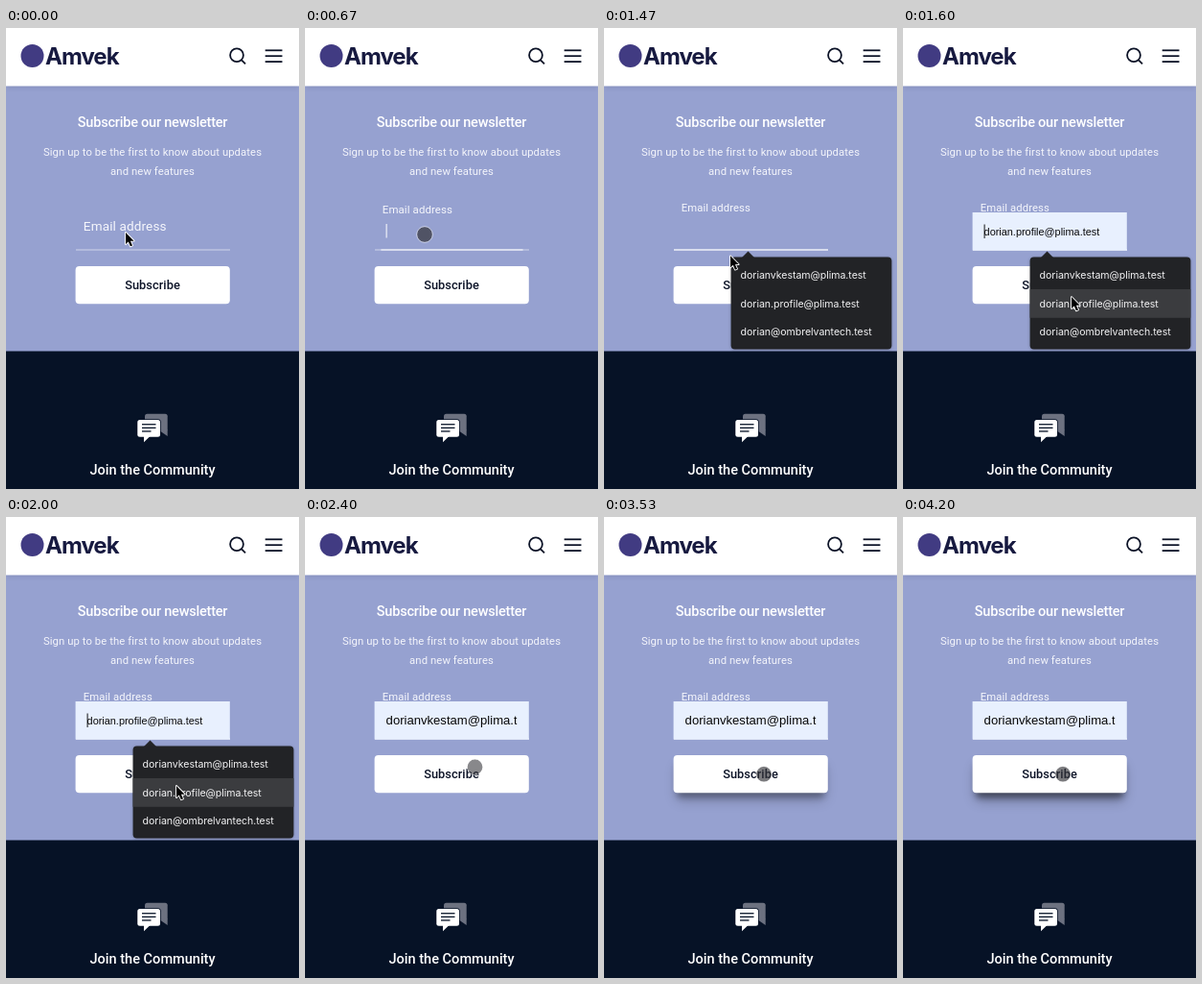
These frames come from a looping animation (306x480 px, 4340 ms). An HTML page with a canvas:

```html
<!DOCTYPE html>
<html lang="en">
<head>
<meta charset="utf-8">
<title>Newsletter form</title>
<style>
  html, body { margin: 0; width: 100%; height: 100%; overflow: hidden; background: #96a1d0; }
  canvas { display: block; width: 306px; height: 480px; }
</style>
</head>
<body>
<canvas id="stage"></canvas>
<script>
const W = 306, H = 480, LOOP = 4340, STEP = 200 / 3;
const canvas = document.getElementById('stage');
const ctx = canvas.getContext('2d');
const ratio = window.devicePixelRatio || 1;
canvas.width = W * ratio;
canvas.height = H * ratio;

const ROBOTO = 'Roboto, sans-serif';
const ARIAL = '"Liberation Sans", Arial, sans-serif';
const INTER = 'Inter, sans-serif';
const NAVY = '#061226', INK = '#0b1226', LAVENDER = '#96a1d0';
const EMAILS = [
  'dorianvkestam@plima.test',
  'dorian.profile@plima.test',
  'dorian@ombrelvantech.test'
];

// Pointer path: time, x, y
const PATH = [
  [1333, 125, 213], [1400, 127, 222], [1467, 132, 237.3], [1533, 152, 260],
  [1600, 176, 280], [1667, 178, 290], [1800, 178, 298], [1867, 178, 298],
  [1933, 178, 293], [2000, 178, 280], [2133, 177, 264], [2200, 177, 260],
  [2733, 177, 260], [2800, 175, 262], [3000, 166.5, 267.5]
];

function pointerAt(t) {
  let prev = PATH[0];
  for (const next of PATH) {
    if (t < next[0]) {
      const k = Math.max(0, (t - prev[0]) / (next[0] - prev[0] || 1));
      return [prev[1] + (next[1] - prev[1]) * k, prev[2] + (next[2] - prev[2]) * k];
    }
    prev = next;
  }
  return [prev[1], prev[2]];
}

function rect(x, y, w, h, color, r = 0) {
  ctx.fillStyle = color;
  ctx.beginPath();
  ctx.roundRect(x, y, w, h, r);
  ctx.fill();
}

function poly(points, color) {
  ctx.fillStyle = color;
  ctx.beginPath();
  points.forEach(([x, y]) => ctx.lineTo(x, y));
  ctx.closePath();
  ctx.fill();
}

function disc(x, y, r, color) {
  ctx.fillStyle = color;
  ctx.beginPath();
  ctx.arc(x, y, r, 0, Math.PI * 2);
  ctx.fill();
}

function text(str, x, y, font, color, spacing = 0, align = 'left') {
  ctx.font = font;
  ctx.fillStyle = color;
  ctx.textAlign = align;
  ctx.letterSpacing = spacing + 'px';
  ctx.fillText(str, x, y);
}

function withShadow(color, blur, dy, draw) {
  ctx.save();
  ctx.shadowColor = color;
  ctx.shadowBlur = blur * ratio;
  ctx.shadowOffsetY = dy * ratio;
  draw();
  ctx.restore();
}

function drawHeader() {
  withShadow('rgba(20,25,60,.18)', 6, 1, () => rect(0, 0, W, 60.4, '#fff'));
  disc(27.5, 29, 12, '#413b82');
  text('Amvek', 41, 37.5, `700 24px ${INTER}`, '#171a40', -1);

  ctx.strokeStyle = INK;
  ctx.lineWidth = 1.8;
  ctx.beginPath();
  ctx.arc(241, 28.3, 6.9, 0, Math.PI * 2);
  ctx.moveTo(246, 33.3);
  ctx.lineTo(250, 37.4);
  ctx.stroke();
  for (const y of [22.4, 28.3, 34.2]) rect(270.7, y, 17.8, 1.8, INK);
}

function drawFooter() {
  rect(0, 336.4, W, H - 336.4, NAVY);

  rect(145, 401.7, 23.7, 18, '#6c7180', 2.5);
  poly([[160, 419], [168.7, 418], [168.7, 425]], '#6c7180');
  rect(136.8, 407.3, 24.9, 19.2, NAVY, 3);
  rect(137.3, 408, 23.7, 17.8, '#fff', 2.5);
  poly([[144, 425], [150.5, 425], [144, 431.3]], '#fff');
  [[412.7, 14.5], [416.3, 14.5], [419.9, 9.5]]
    .forEach(([y, w]) => rect(142, y - 0.6, w, 1.3, NAVY));

  text('Join the Community', 153, 465, `500 14.55px ${ROBOTO}`, '#fff', 0, 'center');
}

function drawIntro() {
  text('Subscribe our newsletter', 153, 103, `500 14.55px ${ROBOTO}`, '#fff', -0.24, 'center');
  const body = `400 11.3px ${ROBOTO}`;
  text('Sign up to be the first to know about updates', 153, 133, body, '#f4f5fb', 0.08, 'center');
  text('and new features', 153, 153, body, '#f4f5fb', 0.08, 'center');
}

function drawField(t, hover) {
  const u = Math.min(1, Math.max(0, (t - 500) / 233));
  const p = 1 - (1 - u) ** 2;
  const filled = t >= 2400;

  rect(73, 230.6, 161, 0.9, 'rgba(255,255,255,.55)');
  if (p > 0) rect(153.5 - 80.5 * p, 230.4, 161 * p, 1.2, '#fff');

  ctx.save();
  ctx.translate(80.8, 210.8 - 19.8 * p);
  ctx.scale(1 - 0.17 * p, 1 - 0.17 * p);
  text('Email address', 0, 0, `400 13.56px ${ROBOTO}`, '#f6f7fc', 0.127);
  ctx.restore();

  if (filled || hover >= 0) {
    rect(72.6, 192, 161.2, 39.6, '#e8f0fe');
    ctx.save();
    ctx.beginPath();
    ctx.rect(84, 195, 137.4, 34);
    ctx.clip();
    text(EMAILS[filled ? 0 : hover], 84.6, 216, `${filled ? 13.1 : 10.9}px ${ARIAL}`, '#080808');
    ctx.restore();
  }

  if (t >= 530 && t < 1060) rect(84.6, 204, 1, 14.5, '#fff');
  if (t >= 1595 && t < 2130) rect(84.6, 204.5, 1, 14.5, '#111');
}

function drawButton(t) {
  const press = t < 3530 ? 0 : Math.min(1, 0.7 + (t - 3530) / 450);
  if (press) {
    // Shadows are cast by a smaller box so they spread downwards
    const core = () => rect(76, 251, 154.6, 36, '#fff', 4);
    withShadow(`rgba(0,0,0,${0.4 * press})`, 6, 5, core);
    withShadow(`rgba(0,0,0,${0.3 * press})`, 13, 8, core);
  }
  rect(72.6, 248, 161.2, 39.2, '#fff', 4);
  text('Subscribe', 153, 272, `500 12.8px ${ROBOTO}`, INK, 0.05, 'center');
}

function drawPopup(hover) {
  const dark = '#222326';
  withShadow('rgba(0,0,0,.25)', 3, 0.5, () => rect(132.6, 238.6, 167.8, 95.8, dark, 4));
  poly([[143.5, 239.5], [150.5, 232.5], [157.5, 239.5]], dark);
  if (hover >= 0) rect(132.6, 242.5 + 29.6 * hover, 167.8, 29.6, '#3b3c3f');
  EMAILS.forEach((mail, i) =>
    text(mail, 142.6, 261 + 29.5 * i, `400 10.6px ${INTER}`, '#f3f3f4', -0.05));
}

function drawArrow(x, y) {
  ctx.save();
  ctx.translate(x, y);
  ctx.beginPath();
  [[0, 0], [0, 12], [2.8, 9.5], [4.9, 14.3], [7, 13.4], [4.9, 8.8], [8.6, 8.7]]
    .forEach(([px, py]) => ctx.lineTo(px, py));
  ctx.closePath();
  ctx.lineJoin = 'round';
  ctx.lineWidth = 1.8;
  ctx.strokeStyle = '#fff';
  ctx.stroke();
  ctx.fillStyle = '#000';
  ctx.fill();
  ctx.restore();
}

function drawTouch(x, y, alpha) {
  disc(x, y, 8, `rgba(50,50,55,${alpha})`);
  ctx.strokeStyle = 'rgba(255,255,255,.5)';
  ctx.lineWidth = 1;
  ctx.beginPath();
  ctx.arc(x, y, 8.3, 0, Math.PI * 2);
  ctx.stroke();
}

function drawPointer(t, x, y) {
  if (t >= 530 && t < 1395) drawTouch(x, y + 2, 0.7);
  else if (t >= 2400) drawTouch(x + 0.5, y + 0.3, t < 2995 ? 0.58 : 0.65);
  else drawArrow(x, y);
}

function draw(ms) {
  // The screen updates fifteen times a second
  const t = Math.floor((ms + 5) / STEP) * STEP + 0.5;
  const [x, y] = pointerAt(t);
  const open = t >= 795 && t < 2400;
  const hover = open && y >= 242 ? Math.min(2, Math.floor((y - 242.5) / 29.6)) : -1;

  ctx.setTransform(ratio, 0, 0, ratio, 0, 0);
  rect(0, 0, W, H, LAVENDER);
  drawFooter();
  drawHeader();
  drawIntro();
  drawField(t, hover);
  drawButton(t);
  if (open) drawPopup(hover);
  drawPointer(t, x, y);
}

const start = performance.now();
function tick() {
  draw((performance.now() - start) % LOOP);
  requestAnimationFrame(tick);
}
tick();
</script>
</body>
</html>
```
